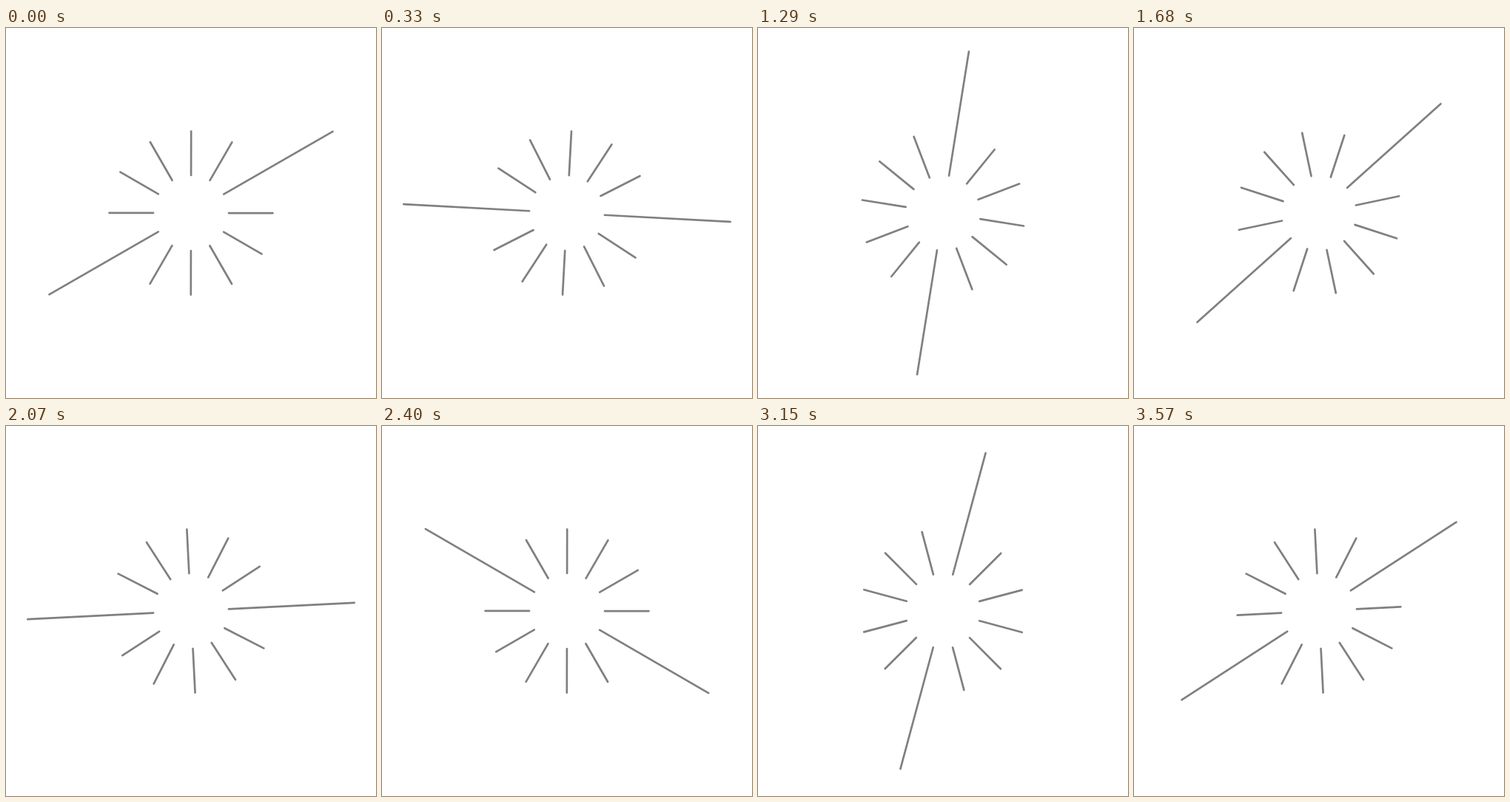
Recreate the animation shown at these times as an HTML page. Size 500x500 px, loop 3.6 s.

```html
<!DOCTYPE html>
<html lang="en">
<head>
<meta charset="utf-8">
<title>Rotating rays</title>
<style>
  html, body { margin: 0; width: 100%; height: 100%; overflow: hidden; background: #fff; }
  svg { display: block; width: 500px; height: 500px; }
</style>
</head>
<body>
<svg viewBox="0 0 500 500">
  <g id="rays" fill="none" stroke="#808080" stroke-width="2.7" stroke-linecap="round"></g>
</svg>
<script>
  const LOOP = 3600, RAYS = 12, INNER = 51, SHORT = 110.5, LONG = 221;
  const START = -30;
  const rays = document.getElementById('rays');

  // Two opposite rays are long, all others are short.
  for (let i = 0; i < RAYS; i++) {
    const line = document.createElementNS(rays.namespaceURI, 'path');
    line.setAttribute('d', `M${INNER} 0H${i % (RAYS / 2) ? SHORT : LONG}`);
    line.setAttribute('transform', `rotate(${i * 360 / RAYS})`);
    rays.append(line);
  }

  function draw() {
    const turn = performance.now() % LOOP / LOOP;
    rays.setAttribute('transform', `translate(250 250) rotate(${START + 360 * turn})`);
    requestAnimationFrame(draw);
  }
  draw();
</script>
</body>
</html>
```
